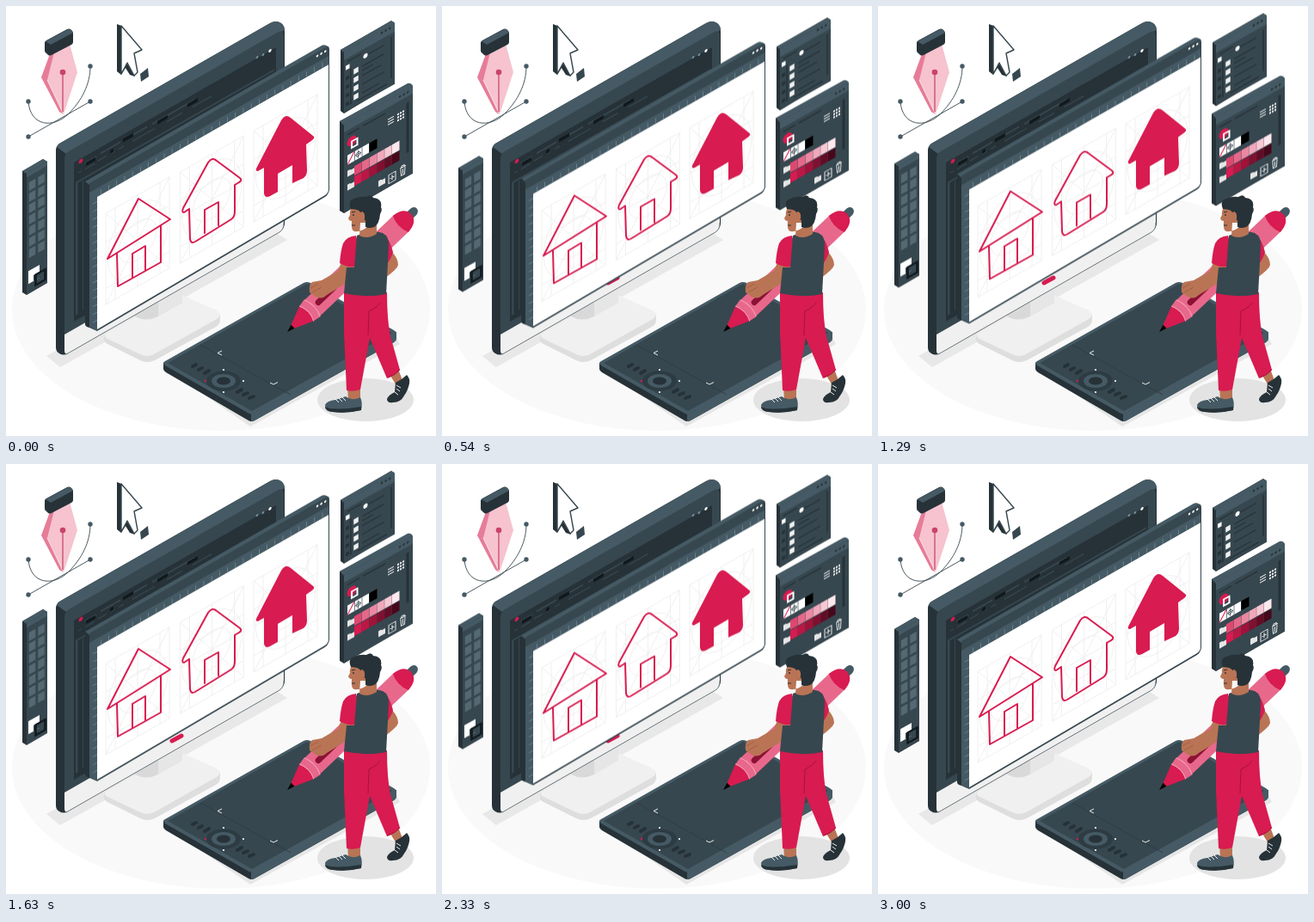
Recreate the animation shown at these times as an HTML page. Size 500 px wide and 500 px high, loop 3.04 s.

```html
<!DOCTYPE html>
<html lang="en">
<head>
<meta charset="utf-8">
<title>Designer at work</title>
<style>
html, body { margin: 0; width: 100%; height: 100%; overflow: hidden; background: #fff; }
svg { display: block; width: 100vw; height: 100vh; }
.float { animation: float 3.04s linear infinite; }
@keyframes float {
  0%, 98.68%, 100% { transform: translateY(0); }
  49.34% { transform: translateY(-10px); }
}
.ink { fill: #263238; }
.slate { fill: #37474f; }
.steel { fill: #455a64; }
.red { fill: #d81b50; }
.pink { fill: #e8688c; }
.skin { fill: #b97455; }
.white { fill: #fff; }
.line { fill: none; stroke: #37474f; }
.house { fill: none; stroke: #d81b50; stroke-width: 2; stroke-linejoin: round; stroke-linecap: round; }
.guide { fill: none; stroke: #ededed; stroke-width: .7; }
.thin { fill: none; stroke: #fff; stroke-width: .9; }
</style>
</head>
<body>
<svg viewBox="0 0 500 500">
  <defs>
    <g id="guide" class="guide">
      <path d="M-37-53H37V53H-37ZM-37-53L37 53M37-53L-37 53M0-53V53M-37 0H37M-37-20H37M-37 34H37M-26-53V53M26-53V53"/>
      <ellipse rx="35" ry="43"/>
      <circle r="22"/>
    </g>
    <path id="folder" d="M0 1H3L4 2H8V8H0Z" fill="#e6e6e6"/>
    <g id="dots"><circle r="1.3"/><circle cx="4.6" r="1.3"/><circle cx="9.2" r="1.3"/></g>
  </defs>

  <ellipse cx="250" cy="353" rx="243" ry="141" fill="#f9f9f9"/>

  <!-- shadows -->
  <path d="M47 407L63 420L327 272L310 261Z" fill="#e8e8e8"/>
  <ellipse cx="418" cy="458" rx="56" ry="25" fill="#e3e3e3"/>
  <path d="M190 424L284 489L458 393L450 380Z" fill="#e6e6e6"/>

  <!-- monitor stand -->
  <path d="M114 383V389Q115 392 120 394L156 412Q164 416 173 412L244 373Q249 370 249 365V359Z" fill="#dedede"/>
  <path d="M117 380L200 334L245 354Q252 359 245 364L172 405Q164 409 156 405L118 387Q112 384 117 380Z" fill="#f0f0f0"/>
  <path d="M150 345V361Q163 368 177 361V335Z" fill="#d9d9d9"/>
  <path d="M177 335V361L205 345V320Z" fill="#e6e6e6"/>

  <!-- monitor -->
  <path class="ink" d="M58 168Q58 163 62 160L307 20Q314 16 320 20Q324 23 324 30V252Q324 259 318 263L72 404Q67 407 62 404Q58 402 58 397Z"/>
  <path class="steel" d="M59 164Q60 161 62 160L307 20Q314 16 320 20Q324 23 324 28L70 172Z"/>
  <path d="M68 381L323 235V254Q323 260 318 263L72 404Q68 406 68 400Z" fill="#f0f0f0"/>
  <path d="M70 405L318 263Q323 260 323 252" fill="none" stroke="#37474f" stroke-width=".6"/>
  <path class="slate" d="M68 178Q68 172 73 169L315 31Q323 27 323 34V236L68 382Z"/>
  <g transform="matrix(1 -.57 0 1 79 184)">
    <rect class="ink" y="-2" width="235" height="185"/>
    <rect class="slate" x="2" y="22" width="231" height="2"/>
    <rect class="slate" x="2" y="22" width="2.5" height="155"/>
    <rect class="slate" x="10" y="25" width="1" height="150"/>
    <circle class="red" cx="8" cy="1" r="2.4"/>
    <path d="M13 6H26M31 5H54M60 5H85M91 5H140" class="line" stroke-width="2"/>
    <path d="M5 13H9M13 13H24M28 12H38M42 12H47M52 12H58M68 12H94M108 12H126M138 12H160" class="line" stroke-width="1.4"/>
    <path d="M57 5H69M97 7H109M132 7H144" stroke="#11191d" stroke-width="4"/>
    <path d="M14 8H25M42 10H46" stroke="#11191d" stroke-width="4"/>
    <g fill="#78909c"><circle cx="213" cy="-3" r="1.4"/><circle cx="220" cy="-2" r="1.4"/></g>
    <circle class="white" cx="228" cy="-2" r="1.7"/>
  </g>
  <path d="M193 322L204 316" stroke="#d81b50" stroke-width="5" stroke-linecap="round"/>

  <!-- curve and nib -->
  <path class="line" stroke-width=".9" d="M26 111C28 140 55 143 73 125C88 110 98 91 98 70M26 152L98 111"/>
  <g class="steel"><circle cx="98" cy="70" r="2.7"/><circle cx="26" cy="111" r="2.7"/><circle cx="26" cy="152" r="2.7"/><circle cx="98" cy="111" r="2.7"/></g>
  <path d="M52 53L41 83L62 123L67 126L62 80L58 52Z" fill="#e67c98"/>
  <path d="M56 54L48 86L67 126L83 77L74 44Z" fill="#f6c3cf"/>
  <path d="M67 126L48 86" stroke="#fbe3e8" fill="none"/>
  <path d="M66 78V123" stroke="#b3153f" stroke-width=".9"/>
  <circle cx="66" cy="77" r="3.3" fill="#c94468"/>
  <path class="ink" d="M45 43Q45 41 47 40L71 27Q73 26 75 27L77 29Q78 30 78 32V42Q78 44 76 45L53 57Q51 58 49 57L47 55Q45 54 45 52Z"/>
  <path class="steel" d="M46 41L72 27Q75 26 78 31L52 45Z"/>

  <!-- cursor -->
  <path class="ink" d="M129 21L134 23L141 67L150 82L144 80L139 72L134 80L129 76Z"/>
  <path d="M134 23L158 51L149 55L153 77L149 81L141 66L134 79Z" fill="#fff" stroke="#37474f" stroke-width="1.4" stroke-linejoin="round"/>
  <path class="slate" d="M156 79L165 72L166 82L157 88Z"/>

  <g class="float">
    <!-- tool strip -->
    <path class="ink" d="M19 192L43 178L48 181V322L24 336L19 333Z"/>
    <path class="steel" d="M19 192L43 178L48 181L24 195Z"/>
    <g transform="matrix(1 -.57 0 1 24 194.5)">
      <rect class="slate" width="24" height="141"/>
      <rect class="steel" width="24" height="5"/>
      <path d="M6.5 12V103M17 12V103" stroke="#546972" stroke-width="7.5" stroke-dasharray="10 3"/>
      <rect class="white" x="2" y="115" width="13" height="15"/>
      <path d="M8 123V130H15V123Z" class="slate"/>
      <rect x="10.5" y="124" width="11" height="12" fill="none" stroke="#11191d" stroke-width="2.6"/>
    </g>

    <!-- drawing window -->
    <path class="ink" d="M92 204L97 206V374L106 377L94 373Q92 372 92 370Z"/>
    <path class="steel" d="M92 204L367 46Q371 44 376 48L97 208Z"/>
    <path class="slate" d="M97 206L372 48Q376 46 376 51V214Q375 219 371 222L106 378L97 374Z"/>
    <path class="white" d="M106 221L375 68V213Q375 217 371 220L106 376Z"/>
    <path class="steel" d="M97 217L375 58V68L106 222V377L97 373Z"/>
    <g transform="matrix(1 -.573 0 1 97 210)" stroke="#78909c">
      <path d="M13 14H278" stroke-width="6" stroke-dasharray=".7 8.5"/>
      <path d="M6.5 22V168" stroke-width="5" stroke-dasharray=".7 8.5"/>
    </g>
    <g class="white" transform="matrix(1 -.573 0 1 362 58)"><use href="#dots"/></g>

    <use href="#guide" transform="matrix(1 -.573 0 1 153 273)"/>
    <use href="#guide" transform="matrix(1 -.573 0 1 239.5 225)"/>
    <use href="#guide" transform="matrix(1 -.573 0 1 325 177)"/>
    <path class="house" d="M154 224L118 294L191 248ZM129 288L130 326L180 298V255M147 316V288L162 279V307"/>
    <path class="house" d="M213 236L207 240Q204 240 206 235L235 182Q240 175 245 180L272 200Q275 203 271 205L266 208V239Q266 245 262 248L220 274Q215 277 214 271L213 236M231 264V237L247 228V255"/>
    <path class="red" d="M300 188L293 192Q289 192 292 187L320 133Q325 125 331 130L357 151Q360 153 356 156L349 161L350 191Q350 197 346 200L333 206V185L316 195V216L307 221Q301 224 300 218Z"/>

    <!-- layer panel -->
    <path class="ink" d="M389 51L448 17L452 20V89L393 125L389 122Z"/>
    <path class="steel" d="M389 51L447 18Q450 17 452 20L393 54Z"/>
    <g transform="matrix(1 -.565 0 1 393 53)">
      <rect class="slate" width="59" height="71"/>
      <rect class="steel" width="59" height="10"/>
      <g class="ink" transform="translate(44 3)"><use href="#dots"/></g>
      <path d="M8 24V66M55 14V62" stroke="#263238" stroke-width="1.6"/>
      <path d="M4 14H20M28 19H47M21 29H46M21 34H34M21 40H43M21 50H47M21 60H41M16 66H50" stroke="#263238" stroke-width="1.3"/>
      <path d="M14 27V67" stroke="#f0f0f0" stroke-width="5.5" stroke-dasharray="6 4"/>
      <rect class="white" x="2" y="18" width="4.5" height="5"/>
      <circle class="white" cx="25" cy="19" r="2.6"/>
      <path d="M4 31V65" stroke="#263238" stroke-width="4" stroke-dasharray="4 6"/>
    </g>

    <!-- swatch panel -->
    <path class="ink" d="M388 134L468 90L473 93V194L393 241L388 238Z"/>
    <path class="steel" d="M388 134L467 90Q471 89 473 93L393 139Z"/>
    <g transform="matrix(1 -.565 0 1 393 138)">
      <rect class="slate" width="80" height="102"/>
      <rect class="steel" width="80" height="9"/>
      <g class="ink" transform="translate(65 4)"><use href="#dots"/></g>
      <path d="M4 14H18M22 14H48" stroke="#263238" stroke-width="1.5"/>
      <path d="M74 16V74" stroke="#263238" stroke-width="3"/>
      <path class="thin" d="M51 23H58M51 26H58M51 29H58"/>
      <path d="M62 23.5H70M62 27H70M62 30.5H70" stroke="#fff" stroke-width="2" stroke-dasharray="2 1"/>
      <circle class="red" cx="9" cy="24" r="5.5"/>
      <path d="M9 24.5H15.5V32H9Z" fill="none" stroke="#fff" stroke-width="2"/>
      <path class="white" d="M4 38H29V49H4Z"/>
      <path d="M4 49L12 38" stroke="#d81b50" stroke-width="1.4"/>
      <path d="M13 43.5H20M16.5 39V48" stroke="#37474f" stroke-width=".8"/>
      <circle cx="16.5" cy="43.5" r="2.5" class="line" stroke-width=".7"/>
      <path d="M12.5 38V49M21 38V49" class="line" stroke-width=".6"/>
      <rect x="29.5" y="38" width="9" height="11"/>
      <use href="#folder" x="4" y="55"/><use href="#folder" x="4" y="71"/>
      <g id="swatches"></g>
      <use href="#folder" x="40" y="87"/>
      <path class="thin" d="M52 88H60V98H52ZM53.5 93H58.5M56 90V96M65 88H72M67 88V86H70V88M66 89L66.5 97H70.5L71 89M68.5 90V96"/>
    </g>
  </g>

  <!-- tablet -->
  <path class="ink" d="M183 415V422Q183 424 186 426L282 482Q285 484 289 482L451 391Q454 389 454 386V379Z"/>
  <path class="steel" d="M285 473V483Q287 483 289 482L451 391Q454 389 454 386V379Z"/>
  <path class="steel" d="M185 413L346 322Q350 320 354 322L451 377Q456 380 451 383L290 473Q285 476 281 473L185 418Q181 415 185 413Z"/>
  <path class="slate" d="M188 415L350 323L449 380L286 471Z"/>
  <path d="M226 394L331 452" stroke="#2f3d44" stroke-width=".9"/>
  <path class="thin" d="M251 401L246 403.500L251 406M307 438L311 440L316 437.500M348 345L353 342L358 345"/>
  <g stroke="#263238" stroke-width="4" stroke-linecap="round">
    <path d="M217 419L221 417M224 423L228 421M231 427L236 424M269 449L274 446M276 452L281 450M283 456L288 454"/>
  </g>
  <ellipse cx="253" cy="436" rx="20" ry="11.500" fill="#2d3b42"/>
  <ellipse cx="253" cy="436" rx="14" ry="8" class="steel"/>
  <ellipse cx="253" cy="436" rx="8" ry="4.500" class="ink"/>
  <g class="white"><circle cx="253" cy="423" r="1.100"/><circle cx="276" cy="436" r="1.100"/><circle cx="253" cy="449" r="1.100"/></g>
  <circle class="red" cx="232" cy="436" r="1.200"/>

  <!-- giant pen -->
  <g transform="translate(327 379) rotate(-43.6)">
    <path class="steel" d="M192-5H203Q208-4 208 0Q208 4 203 5H192Z"/>
    <path class="pink" d="M36-13H184V13H36Z"/>
    <path class="red" d="M182-13Q198-12 199 0Q198 12 182 13Q176 0 182-13Z"/>
    <path class="red" d="M7-2L31-12Q37 0 31 12L7 2Z"/>
    <path class="pink" d="M31-12L40-13.500Q46 0 40 13.500L31 12Q37 0 31-12Z"/>
    <path d="M31-12Q37 0 31 12M40-13.500Q46 0 40 13.500" fill="none" stroke="#f4a5ba" stroke-width="1"/>
    <path d="M50 0H76" stroke="#8c1235" stroke-width="7" stroke-linecap="round"/>
    <path d="M0 0L9-2.800V2.800Z"/>
  </g>

  <!-- designer -->
  <path class="skin" d="M441 291L449 286Q456 294 456 301Q455 306 441 316Z"/>
  <path class="skin" d="M397 440H412V459H398ZM444 425L456 422L462 438L455 443Z"/>
  <path class="ink" d="M453 438Q461 434 466 429Q470 433 469 439Q467 448 463 453Q459 461 450 461Q443 462 443 457Q445 452 452 449Z"/>
  <path class="thin" d="M454 441L459 444M454 445L458 448M452 449L456 452"/>
  <path class="steel" d="M371 464Q373 459 383 458L395 454Q402 460 412 455Q415 462 413 470Q395 474 380 472Q371 472 371 464Z"/>
  <path class="ink" d="M371 466Q380 471 413 466V470Q397 474 380 472Q371 471 371 466Z"/>
  <path class="thin" d="M383 457L387 461M387 456L391 460M391 455L395 459"/>
  <path class="red" d="M393 333H443Q443 365 447 384L458 423Q452 430 443 433L423 386L412 446Q404 449 396 447Q394 400 393 380Z"/>
  <path d="M421 383L422 355Q432 350 435 345M444 432Q453 429 458 423" fill="none" stroke="#a3143c" stroke-width="1"/>
  <path class="skin" d="M390 298L405 303Q402 318 394 323L373 336Q367 342 360 338L353 333Q352 324 356 321L367 319L386 308Z"/>
  <path d="M354 328L363 323M356 333L367 327" stroke="#985b42" stroke-width=".8"/>
  <path class="red" d="M407 267Q396 268 392 276Q389 285 388 299Q396 304 405 303L412 285ZM438 265Q446 270 450 286Q448 294 442 301L436 285Z"/>
  <path class="slate" d="M408 267Q424 260 438 264Q446 268 445 280L442 335Q418 340 393 334L396 304H405Z"/>
  <path class="skin" d="M412 252H431V265Q420 272 411 267ZM402 234Q399 240 400 243L398 247Q399 250 402 250Q401 261 405 262Q413 263 420 257L425 233Z"/>
  <path class="ink" d="M401 236Q397 226 405 224Q411 221 419 222Q425 218 427 223Q438 224 436 234Q438 237 435 242Q434 254 428 257Q422 259 418 257V249Q414 249 413 242Q412 236 401 236Z"/>
  <path class="skin" d="M413 245Q410 240 414 239Q418 240 417 248Q414 250 413 245Z"/>
  <path d="M402 240L406 239M402 255L406 255" stroke="#263238" stroke-width="1"/>
  <circle class="ink" cx="404" cy="243" r=".9"/>
</svg>
<script>
const swatches = document.getElementById('swatches');
const rows = [
  { y: 55, from: [222, 72, 112], to: [252, 232, 237] },
  { y: 67, from: [216, 27, 80], to: [70, 8, 26] }
];
for (const { y, from, to } of rows) {
  for (let i = 0; i < 6; i++) {
    const rect = document.createElementNS('http://www.w3.org/2000/svg', 'rect');
    const mix = from.map((c, k) => Math.round(c + (to[k] - c) * i / 5));
    const attrs = { x: 12 + i * 8.8, y, width: 8.5, height: 11, fill: `rgb(${mix})` };
    for (const name in attrs) rect.setAttribute(name, attrs[name]);
    swatches.append(rect);
  }
}
</script>
</body>
</html>
```
